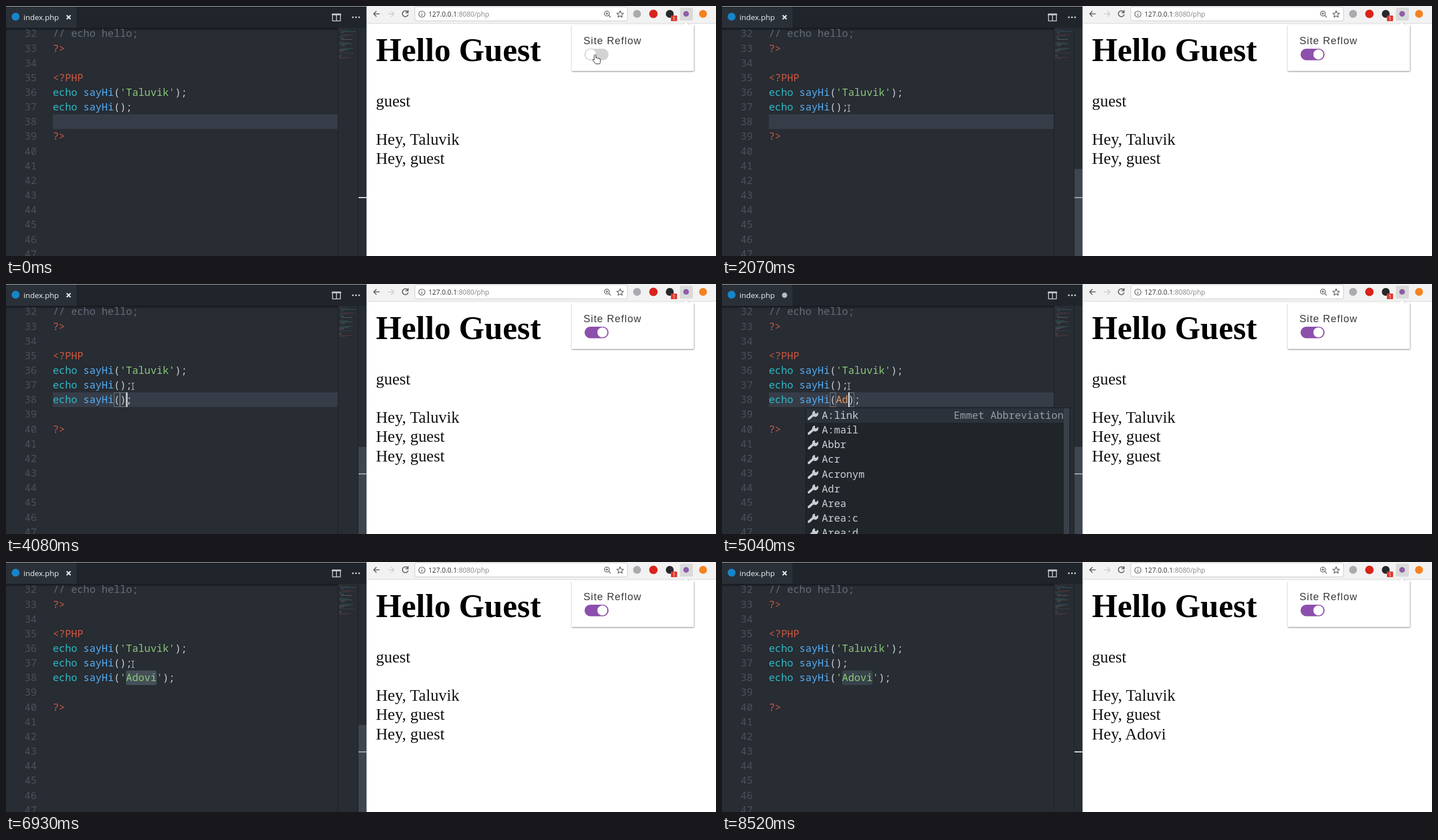
An HTML page that plays this animation: 1259x445 px, repeating every 8580 ms.

```html
<!DOCTYPE html>
<html lang="en">
<head>
<meta charset="utf-8">
<title>Editor and browser</title>
<style>
  html, body { margin: 0; width: 100%; height: 100%; overflow: hidden; background: #fff; }
  svg { display: block; position: absolute; left: 0; top: 0; }
  text { white-space: pre; }
  .code { font: 18.05px "Noto Sans Mono", monospace; }
  .ui { font-family: "Open Sans", sans-serif; }
  .page { font: 28.9px "Liberation Serif", serif; fill: #111; }
  .line { fill: none; stroke-linecap: round; stroke-linejoin: round; }
</style>
</head>
<body>
<svg width="1259" height="445" viewBox="0 0 1259 445">
  <defs>
    <linearGradient id="shade" x2="0" y2="1">
      <stop stop-color="#14171c"/><stop offset="1" stop-color="#14171c" stop-opacity="0"/>
    </linearGradient>
    <filter id="drop" x="-5%" y="-10%" width="110%" height="125%">
      <feDropShadow dx=".5" dy="1" stdDeviation=".8" flood-opacity=".6"/>
    </filter>
    <path id="wrench" d="M-7 6 L1 -1" stroke="#c9cdd3" stroke-width="4.2" stroke-linecap="round"/>
    <path id="jaw" d="M8 -6 A5.5 5.5 0 1 1 2.500 -8.500 L3 -4 L5 -3 Z" fill="#c9cdd3"/>
    <path id="arrow" d="M0 0 V13 L3 10.300 L5 15 L7.200 14 L5.200 9.500 H9.300 Z" fill="#fff" stroke="#222" stroke-width=".9"/>
    <path id="hand" d="M0 1.500 Q1.500 -1 3 1.500 V6.500 Q5 5 6 7 Q8 6 8.700 8 Q10.800 7 11 9.500 V13 Q10.500 16 9.500 17 H2.500 L-2.500 10.500 Q-3 8 0 10 Z" fill="#fff" stroke="#222"/>
    <path id="beam" d="M-2.500 -6 Q0 -6 0 -4.500 Q0 -6 2.500 -6 M0 -5 V5 M-2.500 6 Q0 6 0 4.500 Q0 6 2.500 6" fill="none" stroke="#bfc4ca" stroke-width="1.100"/>
  </defs>

  <!-- editor -->
  <rect width="640" height="445" fill="#282c33"/>
  <rect width="640" height="39" fill="#20252b"/>
  <rect width="125" height="39" fill="#2a3038"/>
  <rect y="39" width="589" height="5" fill="url(#shade)"/>
  <circle cx="17" cy="19" r="7" fill="#1785c9"/>
  <text class="ui" x="31" y="25" font-size="13.500" fill="#f2f4f6">index.php</text>
  <g class="line" stroke="#c8ccd2" stroke-width="1.500">
    <path d="M579 14.500 H593 V26.500 H579 Z M586 15 V26"/><path d="M579 15 H593" stroke-width="3"/>
  </g>
  <path d="M615 20 h.1 M620.500 20 h.1 M626 20 h.1" class="line" stroke="#d5d8dc" stroke-width="3"/>
  <path d="M588.500 40 V445 M624.500 40 V445" stroke="#1c2026"/>
  <g id="minimap" opacity=".42"></g>
  <g id="numbers" class="code" fill="#4a505c"></g>

  <!-- browser -->
  <rect x="640" width="619" height="445" fill="#fff"/>
  <rect x="640" width="619" height="31" fill="#f2f2f2"/>
  <path d="M640 31 H1259" stroke="#d4d4d4"/>
  <rect x="725" y="1.500" width="377" height="25" rx="3" fill="#fff" stroke="#c9c9c9"/>
  <g class="line" stroke="#5a5a5a" stroke-width="1.600">
    <path d="M662 14 H652 M656.500 9.500 L652 14 L656.500 18.500"/>
    <path d="M678 14 H688 M683.500 9.500 L688 14 L683.500 18.500" stroke="#cdcdcd"/>
    <path d="M712.500 11 A5.200 5.200 0 1 0 713 15.500 M713 8 V12 H709"/>
    <g stroke-width="1.200">
      <circle cx="737.500" cy="14.500" r="5.500"/><path d="M737.500 14 V17.500 M737.500 11.500 v.2"/>
      <circle cx="1065.500" cy="13.500" r="4.300"/><path d="M1069 17 L1072 20 M1063.500 13.500 H1067.500 M1065.500 11.500 V15.500"/>
      <path d="M1089 8.500 L1090.800 12.700 L1095 13 L1091.800 15.900 L1092.800 20 L1089 17.700 L1085.200 20 L1086.200 15.900 L1083 13 L1087.200 12.700 Z"/>
    </g>
  </g>
  <text class="ui" x="749" y="19" font-size="12" fill="#333">127.0.0.1<tspan fill="#858585">:8080/php</tspan></text>
  <rect x="1195" y="3" width="23" height="23" rx="2" fill="#dadada"/>
  <g id="extensions"></g>
  <rect x="1179" y="17" width="11" height="10" rx="1" fill="#e0392f"/>
  <text class="ui" x="1182" y="25.500" font-size="9" fill="#fff">1</text>
  <path d="M1003 34 H1201 L1206 28.500 L1211 34 H1219.500 V115.500 H1003 Z" fill="#fff" filter="url(#drop)"/>
  <text x="1024" y="67.500" font-family="Liberation Sans, sans-serif" font-size="18" letter-spacing="1.100" fill="#3a3a3a">Site Reflow</text>
  <g class="page">
    <text x="656" y="98" font-size="58.200" font-weight="bold" fill="#000">Hello Guest</text>
    <text x="656" y="178.500">guest</text>
    <text x="656" y="246.500">Hey, Taluvik</text>
    <text x="656" y="281">Hey, guest</text>
  </g>
  <g id="live"></g>
  <path d="M0 .5 H639.500 V445" fill="none" stroke="#b5b8bb"/>
</svg>
<script>
const LOOP = 8580, LEFT = 83, CHAR = 10.83, ROW = 26.15;
const VISITOR = 'Taluvik', FRIEND = 'Adovi';
const RED = '#cf5840', CYAN = '#2bbac5', BLUE = '#55aef5', GREEN = '#8bc97a',
      ORANGE = '#de925f', PLAIN = '#c6cad1', GREY = '#646b77';

const COPY = 2460, SAVE = 3240, TYPE = 4950, SELECT = 5850, QUOTE = 6420, RESAVE = 6690, BLUR = 8520;
const KEYS = [TYPE, 5010, 5190, 5370, 5580];
const HIDDEN_CARET = [[0, 2100], [2970, 3240], [4710, 4800], [6930, 7320], [BLUR, LOOP]];
const MOUSE = [
  [0, 1043, 86], [360, 1043, 86], [900, 1063, 150], [1170, 1063, 150], [1410, 1045, 84],
  [1590, 1045, 84], [2070, 225, 182], [7650, 225, 182], [7830, 621, 281], [8220, 634, 447], [LOOP, 634, 447],
];
const HINTS = ['A:link', 'A:mail', 'Abbr', 'Acr', 'Acronym', 'Adr', 'Area', 'Area:c', 'Area:d'];

const byId = id => document.getElementById(id);
const clamp = v => Math.max(0, Math.min(1, v));
const ramp = (t, from, to) => clamp((t - from) / (to - from));
const smooth = k => k * k * (3 - 2 * k);
const between = (t, from, to) => t >= from && t < to;
const column = c => LEFT + c * CHAR;
const baseline = n => 55.4 + (n - 32) * ROW;
const rect = (x, y, w, h, fill, more = '') =>
  `<rect x="${x}" y="${y}" width="${w}" height="${h}" fill="${fill}" ${more}/>`;
const escapeText = s => s.replace(/&/g, '&amp;').replace(/</g, '&lt;');
const use = (id, x, y) => `<use href="#${id}" x="${x}" y="${y}"/>`;

function codeLine(n, parts) {
  const spans = parts.map(([fill, s]) => `<tspan fill="${fill}">${escapeText(s)}</tspan>`).join('');
  return `<text class="code" x="${LEFT}" y="${baseline(n)}">${spans}</text>`;
}
const call = (color, arg) => [[CYAN, 'echo '], [BLUE, 'sayHi'], [PLAIN, '('], [color, arg], [PLAIN, ');']];

function drawStatic() {
  let numbers = '', map = '';
  for (let n = 32; n <= 47; n++) numbers += `<text x="33" y="${baseline(n)}">${n}</text>`;
  byId('numbers').innerHTML = numbers;

  const colors = [RED, GREY, CYAN, GREEN, PLAIN];
  for (let i = 0; i < 27; i++) {
    if (i % 6 === 4) continue;
    const r = Math.abs(Math.sin(i * 12.9) * 43758) % 1;
    map += rect(591 + (i % 6 > 1 && i < 20 ? 3 : 0), 41 + i * 2, 3 + r * 24, 1, colors[i % 5], 'opacity=".7"');
  }
  byId('minimap').innerHTML = map;

  byId('extensions').innerHTML =
    [[1119, 7, '#a9abae'], [1148, 7.5, '#d9231c'], [1177, 7, '#26282b'], [1206, 5, '#8d5fa8'], [1236, 7, '#f58220']]
      .map(([x, r, fill]) => `<circle cx="${x}" cy="14" r="${r}" fill="${fill}"/>`).join('');
}

function mouseAt(t) {
  const i = MOUSE.findIndex(k => k[0] > t);
  const [t0, x0, y0] = MOUSE[i - 1], [t1, x1, y1] = MOUSE[i];
  const k = smooth(ramp(t, t0, t1));
  return [x0 + (x1 - x0) * k, y0 + (y1 - y0) * k];
}

function caretAt(t, typed) {
  if (t < 3750) return 13;
  if (t < 4230) return 12;
  if (t < SELECT) return 11 + typed;
  if (t < QUOTE) return 16 - Math.min(5, Math.floor((t - SELECT) / 60) + 1);
  return 17;
}

function editor(t) {
  const copied = t >= COPY, quoted = t >= QUOTE;
  const typed = KEYS.filter(k => t >= k).length;
  const arg = quoted ? `'${FRIEND}'` : FRIEND.slice(0, typed);
  const caret = caretAt(t, typed);
  const row = between(t, 2100, COPY) ? 37 : 38;
  const top = baseline(row) - 19.4;
  let s = '';

  if (t < SELECT) s += rect(LEFT, top, 505, 26, '#373d48');
  else {
    const from = quoted ? 12 : caret, to = quoted ? 17 : 16;
    s += rect(column(from), top, (to - from) * CHAR, 26, t < BLUR ? '#454f57' : '#38424a', 'rx="3"');
  }
  if (between(t, 3750, SELECT))
    for (const c of [10, 11 + typed])
      s += rect(column(c) + .5, top + .5, CHAR - 1, 25, '#343a44', 'stroke="#777d86"');

  s += codeLine(32, [[GREY, '// echo hello;']]) + codeLine(33, [[RED, '?>']]) + codeLine(35, [[RED, '<?PHP']])
    + codeLine(36, call(GREEN, `'${VISITOR}'`)) + codeLine(37, call(PLAIN, ''))
    + (copied ? codeLine(38, call(quoted ? GREEN : ORANGE, arg)) : '')
    + codeLine(copied ? 40 : 39, [[RED, '?>']]);

  if (!HIDDEN_CARET.some(([a, b]) => between(t, a, b))) s += rect(column(caret) + .4, top, 2, 26, '#f4f5f6');

  // scroll bar, minimap slider and cursor mark
  const bar = ramp(t, 1860, 1950) * (1 - ramp(t, 8040, 8340));
  const map = ramp(t, 7740, 7800) * (1 - ramp(t, 7980, 8280));
  s += rect(625, 290, 15, 155, '#3f4650', `opacity="${bar}"`)
    + rect(589, 84, 36, 35, '#59636f', `opacity="${map * .3}"`)
    + rect(625, copied ? 337 : 340, 14, 2, bar > .5 ? '#a4a9b0' : '#dde0e3');

  const dirty = between(t, COPY, SAVE) || between(t, TYPE, RESAVE);
  s += dirty ? '<circle cx="111" cy="20" r="4.7" fill="#b9bdc3"/>'
    : '<path d="M107.500 16.500 L114.500 23.500 M114.500 16.500 L107.500 23.500" stroke="#eef0f2" stroke-width="2.300"/>';
  return s;
}

function hints() {
  let s = rect(148.5, 220.5, 468, 230, '#20252a', 'stroke="#181b20"')
    + rect(149, 221, 467, 26, '#2c323b') + rect(606, 221, 10, 224, '#3a4049');
  HINTS.forEach((hint, i) => {
    const y = 234 + i * ROW;
    s += use('wrench', 161, y) + use('jaw', 162, y)
      + `<text class="code" x="177" y="${y + 6}" fill="#ccd0d6">${hint}</text>`;
  });
  return s + '<text class="code" x="411" y="240" fill="#979da6">Emmet Abbreviation</text>';
}

function browser(t) {
  const on = smooth(ramp(t, 1410, 1530));
  const settled = ramp(t, 1590, 1770);
  const purple = '#8d4fac';
  let s = rect(1026, 76, 42.5, 20.5, '#d3d3d3', 'rx="10.2"')
    + rect(1026, 76, 42.5, 20.5, purple, `rx="10.2" opacity="${on}"`)
    + `<circle cx="${1037 + on * 20.5}" cy="86.200" r="${10 - settled * .6}" fill="#fff" stroke="${on > .5 ? purple : '#c6c6c6'}"/>`;
  if (t >= 3450)
    s += `<text class="page" x="656" y="315.500">Hey, ${t < 6990 ? 'guest' : FRIEND}</text>`;
  return s;
}

function pointer(t) {
  const [x, y] = mouseAt(t);
  const onToggle = x > 1026 && x < 1068 && y > 76 && y < 97;
  return use(onToggle ? 'hand' : x < 588 ? 'beam' : 'arrow', x, y);
}

let shown = '';
function frame(now) {
  const t = now % LOOP;
  const scene = editor(t) + (between(t, 4980, 5250) ? hints() : '') + browser(t) + pointer(t);
  if (scene !== shown) byId('live').innerHTML = shown = scene;
  requestAnimationFrame(frame);
}

drawStatic();
frame(0);
</script>
</body>
</html>
```
